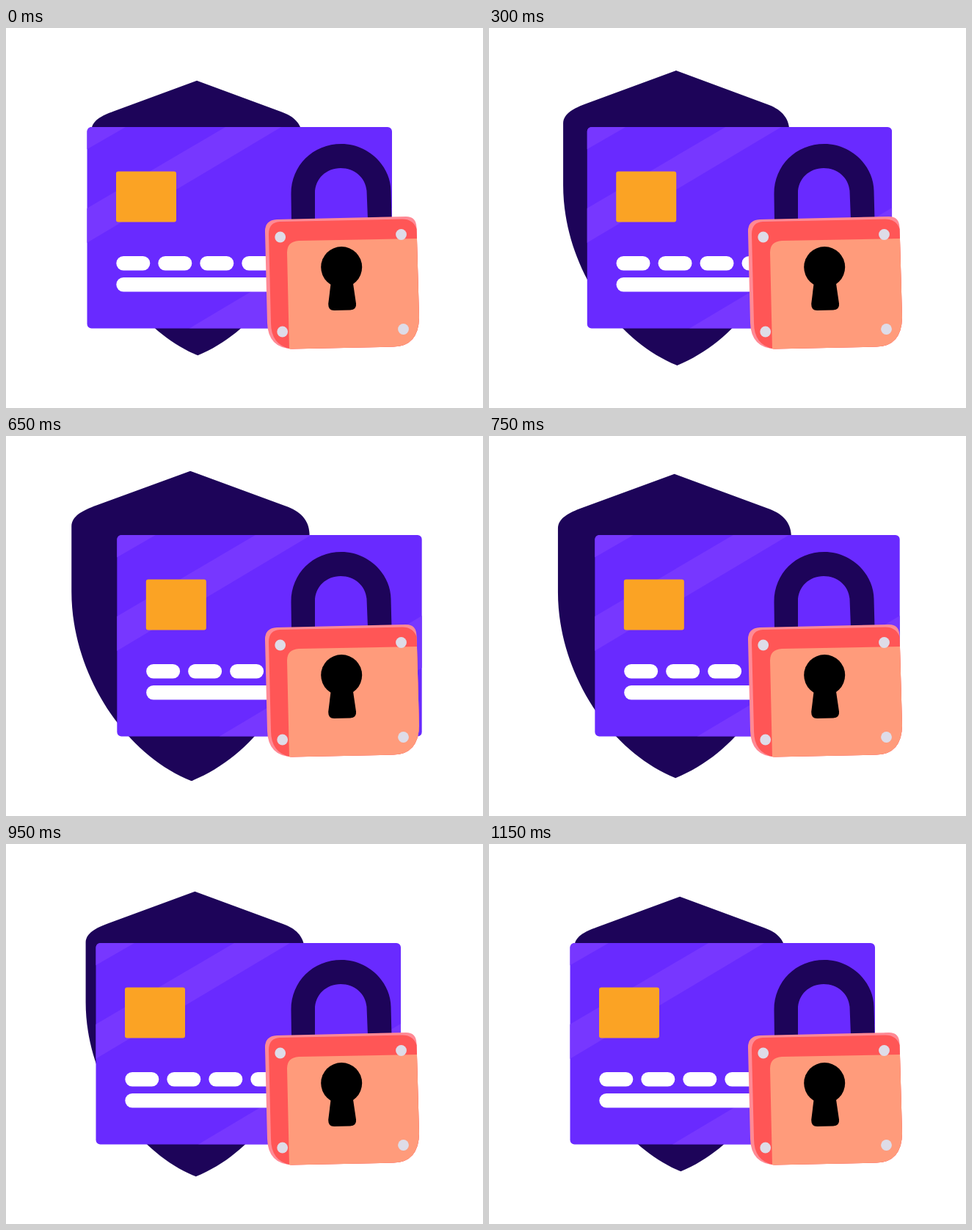
An HTML page that plays this animation: 650x518 px, repeating every 1.2 s.

```html
<!DOCTYPE html>
<html lang="en">
<head>
<meta charset="utf-8">
<title>Secure card</title>
<style>
  html, body { margin: 0; height: 100%; overflow: hidden; background: #fff; }
  svg { display: block; width: 100vw; height: 100vh; }
  .navy { fill: #1d0459; }
</style>
</head>
<body>
<svg viewBox="0 0 650 518">
  <clipPath id="cardShape"><rect x="110.5" y="135" width="415.5" height="274.5" rx="6"/></clipPath>

  <path id="shield" class="navy" d="M251 47.5 L381 95.5 C400 102 413 114 413.5 133 V212
    C414 323 350 431 252.5 470.5 C160 433 89 323 89 212 V123 C89.5 109 104 101.5 123 94.5 Z"/>

  <g id="card">
    <g clip-path="url(#cardShape)">
      <path fill="#692aff" d="M110 135H526V410H110Z"/>
      <path fill="#7737ff" d="M110 135H163L110 165.5Z M299 135H375L110 293V246Z M250 409.5L526 245V316L370 409.5Z"/>
    </g>
    <rect x="150" y="195.5" width="82" height="69" rx="3" fill="#fba324"/>
    <g fill="#fff">
      <rect x="150.3" y="311" width="46" height="19.5" rx="9.75"/>
      <rect x="207.3" y="311" width="46" height="19.5" rx="9.75"/>
      <rect x="264.3" y="311" width="46" height="19.5" rx="9.75"/>
      <rect x="321.3" y="311" width="46" height="19.5" rx="9.75"/>
      <rect x="150.3" y="340" width="217" height="19.5" rx="9.75"/>
    </g>
  </g>

  <g id="lock">
    <path class="navy" d="M389 263 L388.5 227 C388 188 418 158 457 158 C494 158 524 188 524.5 222 L525.5 261
      H493 L491.5 222 C490 204 475 191 456 191 C436 191 420.5 206 421 226 V263 Z"/>
    <path fill="#ff8a95" d="M369 261 L545 257 Q559 257 559.5 272 L563 395 Q562 434 528 434.5
      L390 437.5 Q357 436 356 402 L353 278 Q352.5 262 369 261 Z"/>
    <path fill="#ff5656" d="M373 264 L540 260.5 Q555 260.5 559.6 274 L563 395 Q562 434 528 434.5
      L388 437.5 Q361 432 361 402 L358 281 Q358 265 373 264 Z"/>
    <path fill="#ff9b7b" d="M399 290 L560 287 L563 395 Q562 434 528 434.5 L386 437.5 L383 306 Q383 291 399 290 Z"/>
    <g fill="#dedce8">
      <circle cx="373.7" cy="285" r="7.4"/>
      <circle cx="538.5" cy="281.5" r="7.4"/>
      <circle cx="376.7" cy="414" r="7.4"/>
      <circle cx="541.5" cy="410.5" r="7.4"/>
    </g>
    <circle cx="457.2" cy="326" r="28"/>
    <path d="M443 345 L439.2 376 Q439 385 447 385 L469 384.5 Q478 384 477 375.5 L472.5 345 Z"/>
  </g>
</svg>
<script>
  const shield = document.getElementById("shield");
  const card = document.getElementById("card");
  const STEP = 50, STEPS = 24;

  function draw(now) {
    const n = Math.floor(now / STEP) % STEPS;
    const k = Math.min(n, STEPS - 1 - n);   // out, then back through the same poses
    const p = (1 - Math.cos(Math.PI * (k + 0.13) / 11.56)) / 2;
    card.setAttribute("transform", `translate(${42.4 * p} 0)`);
    shield.setAttribute("transform",
      `translate(${260.3 - 9.2 * p} 259) scale(${0.885 + 0.1187 * p}) translate(-251.3 -259)`);
  }

  const start = performance.now();
  function loop() {
    draw(performance.now() - start);
    requestAnimationFrame(loop);
  }
  loop();
</script>
</body>
</html>
```
